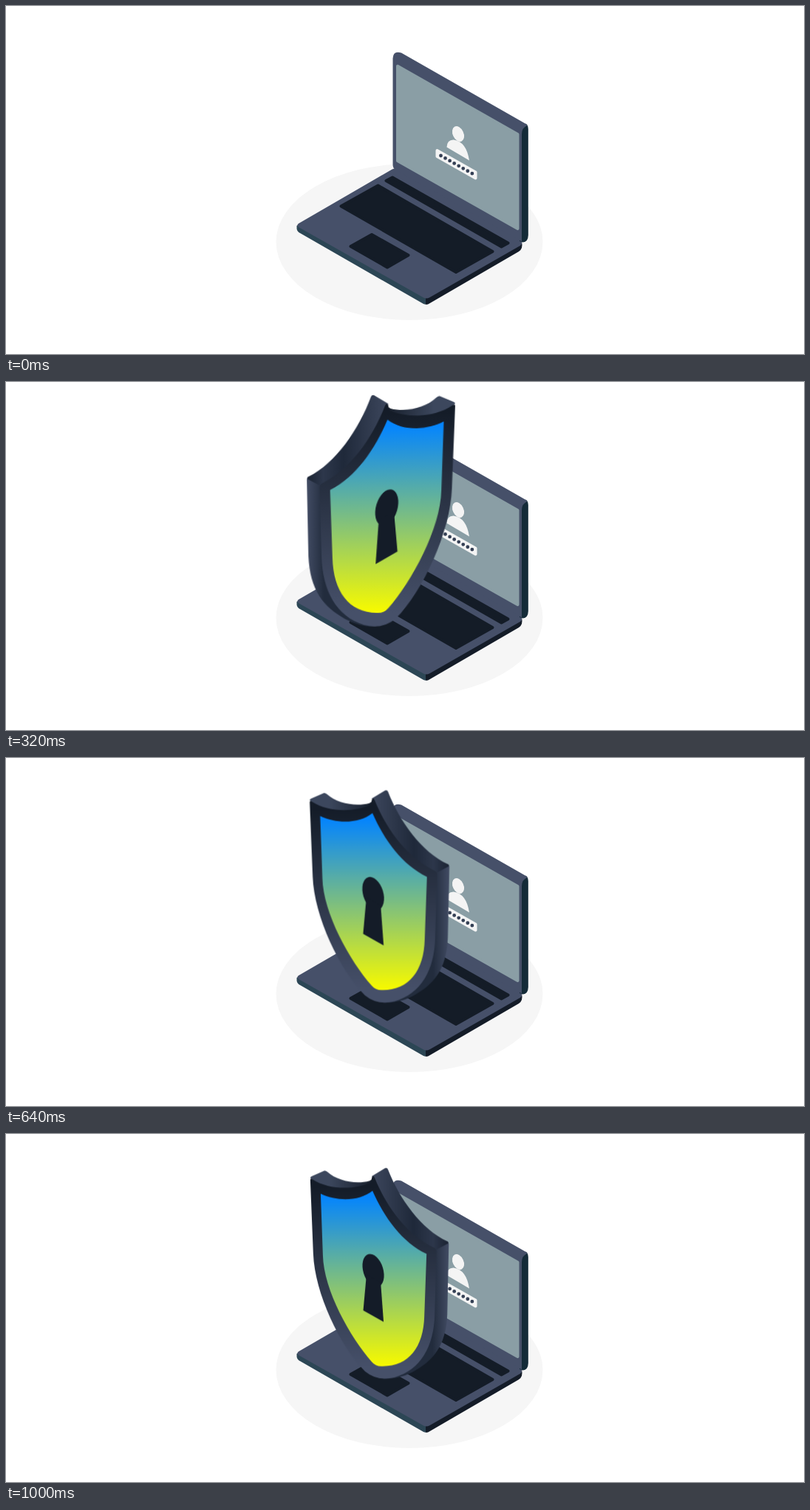
An HTML page that plays this animation: 1080x472 px, repeating every 1040 ms.

```html
<!DOCTYPE html>
<html lang="en">
<head>
<meta charset="utf-8">
<title>Protected laptop</title>
<style>
  html, body { margin: 0; width: 100%; height: 100%; overflow: hidden; background: #fff; }
  #stage { position: relative; width: 1080px; height: 472px; overflow: hidden;
    perspective: 1500px; perspective-origin: 540px 236px; }
  svg { position: absolute; left: 0; top: 0; overflow: visible; }
  #shield { transform-origin: 505.8px 333px; visibility: hidden; }
  .round { stroke-width: 4; stroke-linejoin: round; }
  .dark { fill: #141c27; stroke: #141c27; }
  .glass { fill: #8a9ea5; stroke: #8a9ea5; }
  .light { fill: #f4f4f4; stroke: #f4f4f4; }
</style>
</head>
<body>
<div id="stage">
  <svg width="1080" height="472" viewBox="0 0 1080 472">
    <ellipse cx="546" cy="320" rx="180.5" ry="106" fill="#f6f6f6"/>

    <!-- base -->
    <path fill="#2c4655" d="M393.500 298V302Q394 306 398 308L565 404Q568 405.500 571 404V392L400 294Z"/>
    <path fill="#141c28" d="M568 394L698 320Q699 324 698 328Q697 331 694 333L573 403.500Q570 405.500 568 404.500Z"/>
    <path fill="#465069" d="M396 295L520 223Q524 220 530 220L697 317Q700 322 696 325L573 395.500Q569 397.500 565 395.500L396 300Q393 297 396 295Z"/>
    <path class="dark round" d="M514.500 237L523 232.500L679.500 321.500L670.500 326.500Z"/>
    <path class="dark round" d="M453.500 271.500L503.500 243.500L658.500 333L609 361Z"/>
    <path class="dark round" d="M466.500 326L495 310L544.500 338L516 354.500Z"/>

    <!-- lid -->
    <path fill="#142b38" d="M696 168L703 159.500Q706.800 161 706.800 167V311Q706.500 320 699.500 320.500L695 319Z"/>
    <path fill="#465069" d="M523.500 71Q524 60 535 63.500L702 159Q705 160.500 705.500 162Q698 165 698 174V319.500L527 222Q523.500 220 523.500 215Z"/>
    <path class="glass round" d="M530 81.500L692.500 174V302L530 210Z"/>

    <!-- login -->
    <g fill="#f4f4f4">
      <ellipse cx="612" cy="173.500" rx="7.300" ry="11" transform="rotate(-25 612 173.500)"/>
      <path d="M596.500 191.500Q597 181 606 181.500Q623 184 627 209.500Z"/>
    </g>
    <path class="light round" d="M583.500 196L635.500 225.500V233.500L583.500 204Z"/>
    <path d="M588.500 203L631 227.300" stroke="#354055" stroke-width="4.800" stroke-linecap="round" stroke-dasharray="0 6.970"/>
  </svg>

  <svg id="shield" width="1080" height="472" viewBox="0 0 1080 472">
    <defs>
      <linearGradient id="face" gradientUnits="userSpaceOnUse" x1="0" y1="86" x2="0" y2="312">
        <stop stop-color="#0585fd"/><stop offset="1" stop-color="#f5f902"/>
      </linearGradient>
      <linearGradient id="rim" gradientUnits="userSpaceOnUse" x1="0" y1="70" x2="0" y2="315">
        <stop stop-color="#141c28"/><stop offset="1" stop-color="#465069"/>
      </linearGradient>
      <linearGradient id="notch">
        <stop stop-color="#3c475d"/><stop offset=".3" stop-color="#3c475d"/><stop offset="1" stop-color="#141c28"/>
      </linearGradient>
      <linearGradient id="shoulder">
        <stop stop-color="#3d475d"/><stop offset=".55" stop-color="#1f293a"/><stop offset=".8" stop-color="#2d374b"/><stop offset="1" stop-color="#1b2433"/>
      </linearGradient>
      <linearGradient id="side" gradientUnits="userSpaceOnUse" x1="577" y1="0" x2="600" y2="0">
        <stop stop-color="#222c3d"/><stop offset="1" stop-color="#434d65"/>
      </linearGradient>
    </defs>
    <path fill="url(#side)" d="M580 156L597 146Q599.500 147 599 152L597 245C595 288 578 308 550 323Q530 333 510 332Z"/>
    <path fill="url(#notch)" d="M412 60Q412 59 414 58L431 50.500Q433 50 435 52C449 65 475 69 492 64L500 59L496 74L480 82H435L425 72Z"/>
    <path fill="url(#shoulder)" d="M495 58L513 47Q516 46 517 49C532 88 562 130 597 146Q599 147 598 149L581 158L530 125Z"/>
    <path fill="url(#rim)" d="M412 63Q412 60 415 62C438 77 474 76 493 66Q495 64 495 60Q497 56 499 60C517 104 545 138 580 155Q583 157 582.500 161L580 245C579 288 561 320 526 330Q503 336 486 322C452 288 418 216 416 163Z"/>
    <path fill="url(#face)" d="M426 81.500C448 92 478 92 496 77.500C512 114 536 147 569 163L566 247C565 290 544 316 508 315Q500 315 495 309C466 276 430 212 429 165Z"/>
    <g fill="#141c28">
      <ellipse cx="497" cy="185.500" rx="13.500" ry="23" transform="rotate(-17 497 185.500)"/>
      <path d="M488 190L507 201L511 255L483.500 239.500Z"/>
    </g>
  </svg>
</div>
<script>
  const LOOP = 1040, STEP = 40, GROW = 280, SPIN = 600;
  const shield = document.getElementById('shield');

  // Linear growth followed by a damped overshoot.
  function scaleAt(t) {
    if (t < GROW) return t / GROW;
    const u = (t - GROW) / 1000;
    return 1 + 0.19 * Math.sin(6 * Math.PI * u) * Math.exp(-6 * u);
  }

  function draw() {
    const t = Math.floor(performance.now() % LOOP / STEP) * STEP;
    const angle = t < SPIN ? -360 * t / SPIN : 0;
    shield.style.visibility = t ? 'visible' : 'hidden';
    shield.style.transform = `rotateY(${angle}deg) scale(${scaleAt(t)})`;
    requestAnimationFrame(draw);
  }
  draw();
</script>
</body>
</html>
```
